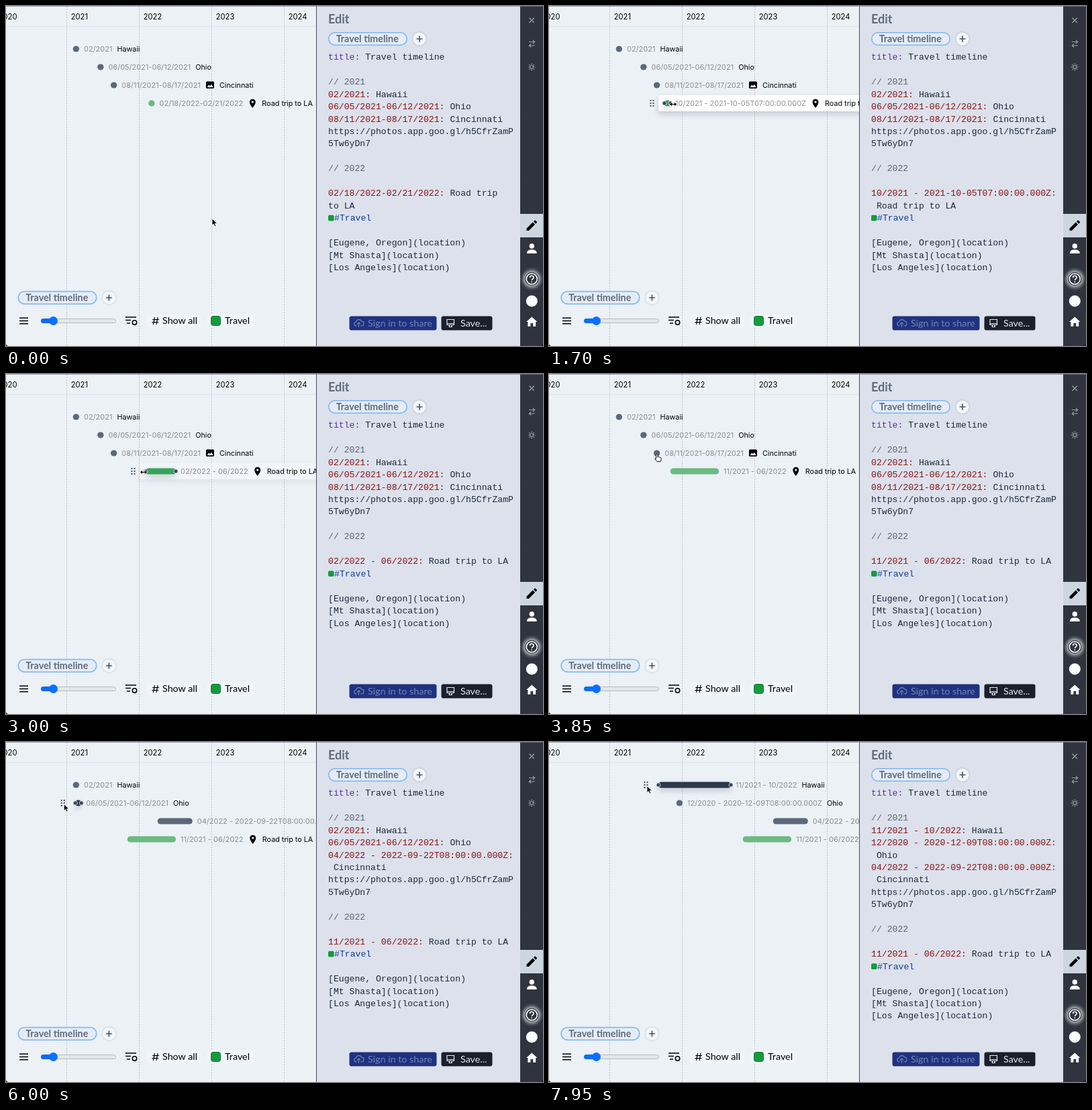
Write an HTML page that moves like this. It is 800x507 px and loops after 8 s.

```html
<!DOCTYPE html>
<html lang="en">
<head>
<meta charset="utf-8">
<title>Travel timeline</title>
<style>
  html, body { margin: 0; width: 100%; height: 100%; overflow: hidden; background: #000; }
  svg { display: block; width: 100vw; height: 100vh; }
  text { white-space: pre; }
  .sans { font-family: Inter, sans-serif; font-size: 11px; }
  .ui { font-family: Lato, sans-serif; font-size: 14.3px; }
  .mono { font-family: "Liberation Mono", monospace; font-size: 13.15px; fill: #1f293a; }
  .bold { font-weight: 700; fill: #626b7b; }
  .line { fill: none; stroke: currentColor; stroke-width: 1.6; }
  .thin { fill: none; stroke: currentColor; stroke-width: 1.2; }
  .date { fill: #8a1414; }
  .note { fill: #5d6675; }
</style>
</head>
<body>
<svg viewBox="0 0 800 507">
  <defs>
    <filter id="shadow" x="-30%" y="-100%" width="160%" height="400%">
      <feDropShadow dx="0" dy="4" stdDeviation="4" flood-color="#1a2636" flood-opacity=".2"/>
    </filter>
    <filter id="soft" x="-50%" y="-50%" width="200%" height="200%">
      <feDropShadow dx="0" dy="0" stdDeviation="1.5" flood-color="#1a2636" flood-opacity=".3"/>
    </filter>
    <filter id="glow" x="-50%" y="-50%" width="200%" height="200%"><feGaussianBlur stdDeviation="2.5"/></filter>
    <pattern id="grain" width="4" height="4" patternUnits="userSpaceOnUse">
      <path d="M0 0h1v1H0zM2 2h1v1H2z" fill="#fff" opacity=".035"/>
    </pattern>
    <g id="pill">
      <rect x="-.5" y="-10.5" width="119" height="21" rx="10.5" fill="#c6ddf7"/>
      <rect x=".8" y="-9.2" width="116.4" height="18.4" rx="9.2" fill="#e4edf7" stroke="#82b6f0" stroke-width="1.5"/>
      <text class="ui bold" x="11.7" y="4.7">Travel timeline</text>
      <circle cx="136" r="9.5" fill="#f3f6fa" filter="url(#soft)"/>
      <path d="M131.5 0h9M136 -4.5v9" stroke="#4b5563" stroke-width="1.7"/>
    </g>
    <g id="photo">
      <rect y="-5.5" width="12" height="10.5" rx="1.5"/>
      <path d="M1.5 3.2L4.2 -.5 6 1.5 8 -1.5 10.6 3.2z" fill="#fff"/>
    </g>
    <path id="pin" fill-rule="evenodd" d="M6 7C3.7 3.8 1.5 .9 1.5 -1.8a4.5 4.5 0 0 1 9 0C10.5 .9 8.3 3.8 6 7zM6 -3.4a1.6 1.6 0 1 0 .01 0z"/>
    <path id="grip" fill="#4b5260" d="M-3 -5h2v2h-2zM1 -5h2v2h-2zM-3 -1h2v2h-2zM1 -1h2v2h-2zM-3 3h2v2h-2zM1 3h2v2h-2z"/>
    <path id="arrow" d="M0 0v10.2l2.4 -2.2 1.6 3.7 1.9 -.8 -1.6 -3.6h3.3z" stroke="#fff" stroke-width=".9"/>
    <path id="resize" d="M-5.5 0l3.8 -3.4v2.4h3.4v-2.4L5.5 0 1.7 3.4V1h-3.4v2.4z" stroke="#fff" stroke-width=".8"/>
    <path id="hand" d="M-1.2 5.5V.8q1.2 -1.4 2.3 0V4.2q1.2 -.8 2 .3 1.2 -.5 1.8 .5 1.5 -.2 1.5 1.4v2.1l-1.2 2.7H.3L-3 7.2q-.3 -1.7 1.8 -.4z" fill="#fff" stroke="#111"/>
  </defs>

  <rect width="464" height="507" fill="#ecf1f6"/>
  <path d="M0 30.5h463" stroke="#dde4eb"/>
  <g id="axis" class="sans"></g>
  <g id="rows" class="sans"></g>

  <use href="#pill" x="17.5" y="435"/>
  <g class="ui">
    <path class="line" d="M20 465.2h13M20 469.5h13M20 473.8h13"/>
    <rect x="52.5" y="466.5" width="111" height="6" rx="3" fill="#e4e7ea" stroke="#b7bbc0"/>
    <rect x="52" y="466" width="20" height="7" rx="3.5" fill="#0a6cf5"/>
    <circle cx="70.5" cy="469.5" r="6.5" fill="#0a70ff"/>
    <path class="line" d="M178 464h16M178 468.5h8M180 473h5"/>
    <circle class="line" cx="191.5" cy="472" r="3.2"/>
    <rect x="210" y="460" width="81" height="19.5" rx="3" fill="#f1f5f9"/>
    <path class="thin" d="M221.5 464l-2 11M226 464l-2 11M218.3 467.6h9.7M217.5 471.6h9.7"/>
    <text x="233" y="474.3">Show all</text>
    <rect x="299" y="460" width="70" height="19.5" rx="3" fill="#f1f5f9"/>
    <rect x="305.5" y="462.5" width="14" height="14" rx="3" fill="#159a3d" stroke="#128035"/>
    <text x="326" y="474.3">Travel</text>
  </g>

  <rect x="462" width="304" height="507" fill="#dce1ec"/>
  <path d="M462.5 0v507" stroke="#474c57"/>
  <text class="ui bold" x="480" y="25.5" style="font-size:18px">Edit</text>
  <use href="#pill" x="480" y="49"/>
  <g id="code" class="mono"></g>
  <g class="ui">
    <rect x="511.5" y="462.5" width="130" height="21" rx="3" fill="#20327f"/>
    <path class="thin" color="#7180b5" d="M523 477h-1a3 3 0 0 1 -.3 -6a4.2 4.2 0 0 1 8 -.8a3.4 3.4 0 0 1 -.2 6.8h-1.5M525.5 479v-6.5M523 474.5l2.5 -2.5 2.5 2.5"/>
    <text x="539" y="477.7" fill="#7783b4">Sign in to share</text>
    <rect x="648.5" y="462.5" width="76" height="21" rx="3" fill="#19202c"/>
    <path class="thin" color="#e6e9ee" d="M657 467.5h10.5v8H657zM659.5 478.5h5.5M660.5 475.5v3M664 475.5v3M657 473.5h10"/>
    <text x="677" y="477.7" fill="#e6e9ee">Save...</text>
  </g>

  <rect x="766" width="34" height="507" fill="#2e333d"/>
  <rect x="766" width="34" height="507" fill="url(#grain)"/>
  <rect x="766" y="310" width="34" height="35" fill="#cdd5e1"/>
  <g class="thin" color="#9ba1ab">
    <path d="M779.5 17.5l7.5 7.5M787 17.5l-7.5 7.5"/>
    <path d="M779 53.5h8.5l-2.7 -2.7M787.5 53.5l-2.7 2.7M788 59h-8.5l2.7 -2.7M779.5 59l2.7 2.7"/>
    <circle cx="783.3" cy="91" r="2.5"/>
    <g id="rays" transform="translate(783.3 91)"></g>
  </g>
  <path d="M775.5 335v-3.3l9.2 -9.2 3.3 3.3 -9.2 9.2zM785.8 321.4l1.7 -1.7q.7 -.5 1.3 0l2 2q.5 .7 0 1.3l-1.7 1.7z"/>
  <g fill="#fff">
    <circle cx="783.3" cy="358" r="3.7"/>
    <path d="M776 369v-2q1 -3.5 7.3 -3.7q6.3 .2 7.3 3.7v2z"/>
    <circle cx="783.3" cy="407" r="13" opacity=".65" filter="url(#glow)"/>
    <circle cx="783.3" cy="407" r="10" fill="#2e333d"/>
    <circle class="line" color="#fff" cx="783.3" cy="407" r="8"/>
    <path class="line" color="#fff" d="M780.5 405.2q0 -3 2.8 -3t2.8 2.7c0 2 -2.8 2 -2.8 4.2M783.3 410.5v1.8"/>
    <circle cx="783.3" cy="440" r="8.5"/>
    <path d="M783.3 463.5l8.2 7.5h-2.3v6.8h-4v-4.9h-3.8v4.9h-4V471h-2.3z"/>
  </g>
  <path d="M0 .5h800" stroke="#777c84" opacity=".7"/>
  <path d="M0 507v-4q0 4 4 4zM800 507v-4q0 4 -4 4z"/>
  <use id="cursor"/>
</svg>
<script>
const LOOP = 8000, MONTH = 9, YEAR = 12 * MONTH, JAN_2021 = 91;
const LINE = 18.45, COLUMNS = 35;
const COMMIT_DELAY = 50, RESCALE = 7280;
const $ = id => document.getElementById(id);
const pen = document.createElement('canvas').getContext('2d');
const widthOf = s => { pen.font = '11px Inter, sans-serif'; return pen.measureText(s).width; };
const clamp = v => Math.max(0, Math.min(1, v));

// Eased value through [time, value] points.
function track(points, t) {
  const i = points.findIndex(p => p[0] > t);
  if (i < 0) return points[points.length - 1][1];
  if (!i) return points[0][1];
  const [t0, a] = points[i - 1], [t1, b] = points[i];
  const k = (t - t0) / (t1 - t0);
  return a + (b - a) * k * k * (3 - 2 * k);
}
const stepAt = (steps, t) => steps.filter(s => s[0] <= t).pop()[1];

// Times on the axis are months since January 2021.
const xAt = (month, t) => JAN_2021 + month * MONTH + (t >= RESCALE ? YEAR : 0);
const makeEvent = (title, y, month, date, look) => ({
  title, y, ...look, start: [[0, month]], end: [[0, month + 1]], dates: [[0, date]], drags: []
});
const hawaii = makeEvent('Hawaii', 64, 1, '02/2021');
const ohio = makeEvent('Ohio', 91, 5.05, '06/05/2021-06/12/2021');
const cincinnati = makeEvent('Cincinnati', 118, 7.25, '08/11/2021-08/17/2021', { icon: 'photo' });
const road = makeEvent('Road trip to LA', 145, 13.5, '02/18/2022-02/21/2022', { icon: 'pin', green: true });
const events = [hawaii, ohio, cincinnati, road];

const pointerX = [[50, 307], [350, 262], [500, 262]];
const pointerY = [[50, 317], [350, 230], [500, 230]];
function movePointer(t, x, y) {
  pointerX.push([t, x]);
  pointerY.push([t, y + 1.5]);
}

// Where the pointer holds an event: its grip, or one of its edges.
function holdX(event, part, t) {
  const left = xAt(track(event.start, t), t), right = xAt(track(event.end, t), t);
  return { move: left - 17, start: left - 3, end: right + 4 }[part];
}

let lastDrag = { to: 0 };
function drag(event, part, from, to, month, date) {
  const { start, end } = event;
  const oldStart = track(start, from), oldEnd = track(end, from);
  if (lastDrag.event !== event) {
    movePointer(from - 130, xAt((oldStart + oldEnd) / 2, from), event.y);
    event.hoverFrom = from - 100;
  }
  const reach = Math.max(from - 60, (from + lastDrag.to) / 2);
  movePointer(reach, holdX(event, part, from), event.y);
  movePointer(from, holdX(event, part, from), event.y);
  start.push([from, oldStart], [to, part === 'end' ? oldStart : month]);
  end.push([from, oldEnd], [to, part === 'end' ? month : part === 'move' ? month + oldEnd - oldStart : oldEnd]);
  movePointer(to, holdX(event, part, to), event.y);
  if (date) event.dates.push([to + COMMIT_DELAY, date]);
  event.hoverTo = to + 100;
  lastDrag = { event, part, from, to, reach };
  event.drags.push(lastDrag);
}

drag(road, 'move', 850, 1300, 9, '10/2021 - 2021-10-05T07:00:00.000Z');
drag(road, 'end', 1740, 2120, 18, '10/2021 - 06/2022');
drag(road, 'start', 2550, 2900, 13, '02/2022 - 06/2022');
drag(road, 'start', 3050, 3400, 10, '11/2021 - 06/2022');
drag(cincinnati, 'end', 3980, 4380, 13, '2021-08-11T07:00:00.000Z - 01/2022');
drag(cincinnati, 'move', 4850, 5370, 15, '04/2022 - 2022-09-22T08:00:00.000Z');
drag(ohio, 'move', 5760, 6180, -1, '12/2020 - 2020-12-09T08:00:00.000Z');
drag(hawaii, 'move', 6420, 6750, 10, '11/2021');
drag(hawaii, 'end', 6800, 7230, 22, '11/2021 - 10/2022');
drag(hawaii, 'move', 7520, 7950, -4);

const isHovered = (e, t) => t >= e.hoverFrom && t < e.hoverTo;

// The row lights up while hovered, not while dragged.
function rowGlow(e, t) {
  if (!isHovered(e, t) || e.drags.some(d => t >= d.from && t < d.to)) return 0;
  const since = Math.max(e.hoverFrom, ...e.drags.map(d => d.to).filter(to => to <= t));
  return clamp((t - since) / 300);
}

function drawEvent(e, t) {
  const left = xAt(track(e.start, t), t), right = xAt(track(e.end, t), t);
  const hovered = isHovered(e, t), glow = rowGlow(e, t), date = stepAt(e.dates, t);
  const textX = right + 7, dateEnd = textX + widthOf(date), titleX = dateEnd + (e.icon ? 28 : 7);
  const fill = e.green ? (hovered ? '#35a25a' : '#6aba82') : hovered ? '#2b394b' : '#5c6879';
  let out = '';
  if (glow) {
    out += `<rect x="${left - 9}" y="${e.y - 12}" width="${titleX + widthOf(e.title) + 17 - left}" height="24" rx="4"
      fill="#fff" opacity="${glow}" filter="url(#shadow)"/>`;
  }
  out += `<rect x="${left - .3}" y="${e.y - 4.6}" width="${right - left + .4}" height="9.2" rx="4.6" fill="${fill}"
    ${hovered ? 'filter="url(#shadow)"' : ''}/>`;
  if (hovered) {
    out += [left, right].map(x =>
      `<circle cx="${x}" cy="${e.y}" r="3.1" fill="#3b4757" stroke="#dfe5ec" stroke-width=".8"/>`).join('');
    out += `<use href="#grip" x="${left - 18.5}" y="${e.y}"/>`;
  }
  out += `<text x="${textX}" y="${e.y + 4}" fill="#8b8f95">${date}</text>`;
  if (e.icon) out += `<use href="#${e.icon}" x="${dateEnd + 8}" y="${e.y}"/>`;
  return out + `<text x="${titleX}" y="${e.y + 4}" style="font-size:10.8px">${e.title}</text>`;
}

const span = (cls, s) => `<tspan class="${cls}">${s}</tspan>`;

function eventLines({ dates, title }, t) {
  const date = stepAt(dates, t) + ':', full = `${date} ${title}`;
  if (date.length >= COLUMNS) return [span('date', date), ' ' + title];
  const cut = full.length <= COLUMNS ? full.length : full.lastIndexOf(' ', COLUMNS - 1);
  const first = span('date', date) + full.slice(date.length, cut);
  return cut < full.length ? [first, full.slice(cut + 1)] : [first];
}

function codeMarkup(t) {
  const [first, second, third, fourth] = events.map(e => eventLines(e, t));
  const lines = ['<tspan fill="#59308f">title:</tspan> Travel timeline', '', span('note', '// 2021'),
    ...first, ...second, ...third, 'https://photos.app.goo.gl/h5CfrZamP', '5Tw6yDn7', '',
    span('note', '// 2022'), '', ...fourth, '#Travel', '',
    '[Eugene, Oregon](location)', '[Mt Shasta](location)', '[Los Angeles](location)'];
  return lines.map((s, i) => {
    const y = 80.3 + i * LINE;
    if (s !== '#Travel') return `<text x="480" y="${y}">${s}</text>`;
    return `<rect x="480" y="${y - 8.3}" width="8.6" height="8.6" rx="2" fill="#159a3d"/>
      <text x="489" y="${y}" fill="#123c9c">${s}</text>`;
  }).join('');
}

function pointerShape(x, y, t) {
  const onEdge = events.some(e => e.drags.some(d => d.part !== 'move' && t >= d.reach && t < d.from + 150));
  if (onEdge) return 'resize';
  const overBar = events.some(e => !isHovered(e, t) && Math.abs(y - e.y) < 8 &&
    x > xAt(track(e.start, t), t) && x < xAt(track(e.end, t), t));
  return overBar ? 'hand' : 'arrow';
}

for (let year = 2020; year <= 2024; year++) {
  const x = JAN_2021 + (year - 2021) * YEAR;
  $('axis').innerHTML += `<path d="M${x - .5} 0V507" stroke="#c3c8ce" stroke-dasharray="2.5 1.5"/>
    <text x="${x + 5.7}" y="20" style="font-size:11.2px">${year}</text>`;
}
for (let angle = 0; angle < 360; angle += 45) {
  $('rays').innerHTML += `<path d="M3.8 0h1.7" transform="rotate(${angle})"/>`;
}

let shownCode = '';
function frame(now) {
  const t = now % LOOP;
  $('rows').innerHTML = events.map(e => drawEvent(e, t)).join('');
  const code = codeMarkup(t);
  if (code !== shownCode) $('code').innerHTML = shownCode = code;
  const x = track(pointerX, t), y = track(pointerY, t);
  $('cursor').setAttribute('href', '#' + pointerShape(x, y, t));
  $('cursor').setAttribute('transform', `translate(${x} ${y})`);
  requestAnimationFrame(frame);
}
requestAnimationFrame(frame);
</script>
</body>
</html>
```
